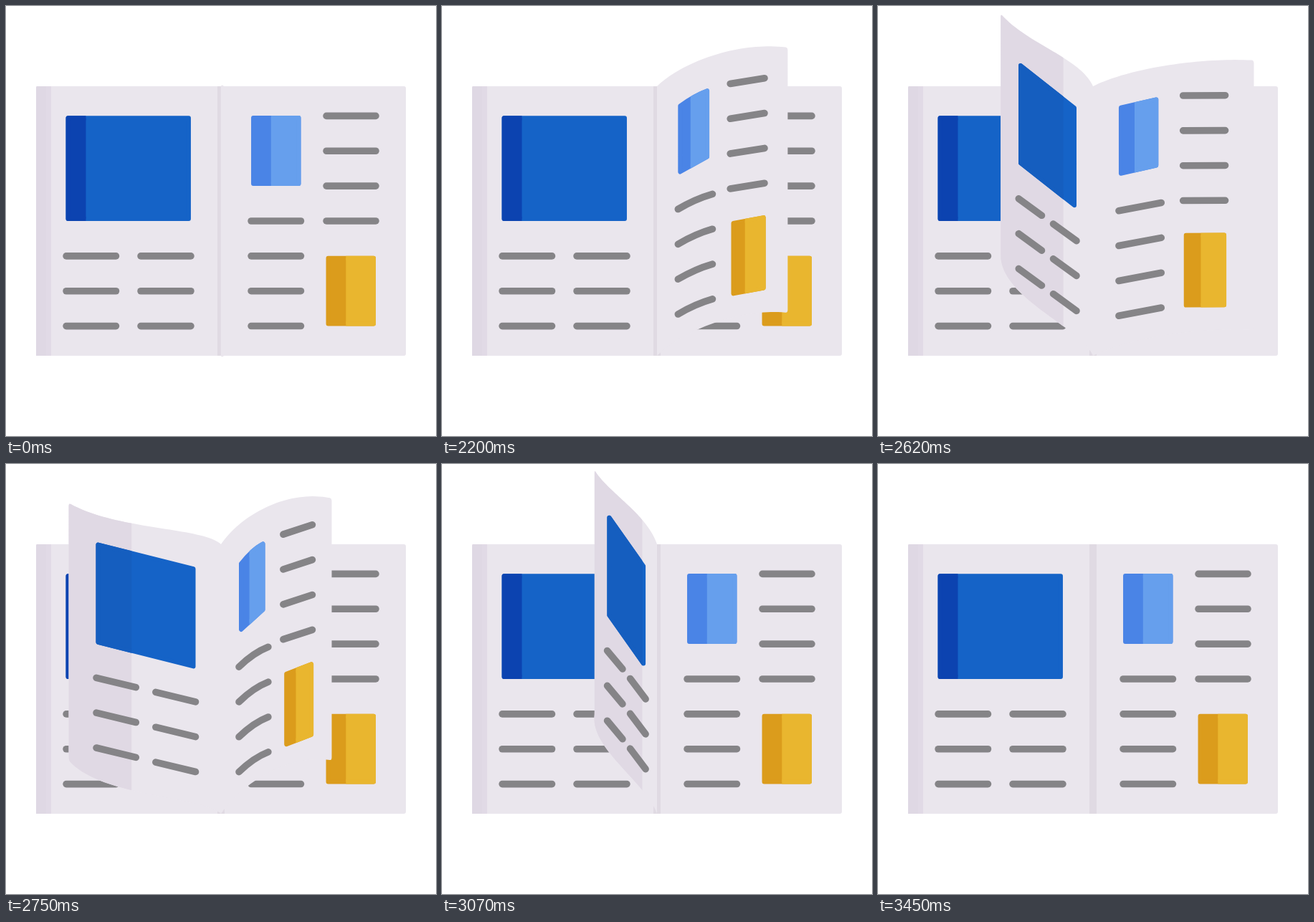
An HTML page with a canvas for the animation above (3.47 s loop, 600 px wide and 600 px high).

```html
<!DOCTYPE html>
<html lang="en">
<head>
<meta charset="utf-8">
<title>Turning pages</title>
<style>
  html, body { margin: 0; width: 100%; height: 100%; overflow: hidden; background: #fff; }
  canvas { display: block; width: 600px; height: 600px; }
</style>
</head>
<body>
<canvas id="stage" width="600" height="600"></canvas>
<script>
const ctx = document.getElementById('stage').getContext('2d');

const LOOP = 3470, STARTS = [2020, 2520], LEAD = 7, TURN = 930;
const SPINE = 300, TOP = 112, BOTTOM = 488;
const PAPER = '#eae6ed', SHADE = '#e0d9e4', LINE = '#858487';

// Each pose: time, top edge curve (x1 y1 x2 y2 x3 y3), bottom edge (x2 y2 y3),
// content x (offset, scale), content lift (constant, linear, square), shade limit, warp
const POSES = [
  [-7, 80, 0, 170, 0, 258, 0, 170, 0, 0, 0, 258, 0, 0, 0, 0, 0],
  [100, 50, 25, 150, 40, 225, 36, 150, 40, 36, 0, 221, 4, 71, -50, 0, 1],
  [380, 1, 45, 14, 104, 60, 89, 12, 120, 112, 0, 61, -12, 191, -64, 0, 1],
  [600, -18, 40, -90, 58, -128, 101, -122, 78, 136, -3.5, -119, 7, 87.5, 0, 0.32, 1],
  [730, -25, 24, -148, 20, -212, 58, -170, 24, 75, -2, -205, 9, 50, 0, 0.585, 1],
  [880, -60, 5, -190, 4, -258, 10, -190, 8, 10, 2, -259, 1, 9.6, 0, 0.857, 0.6],
  [930, -80, 0, -190, 0, -258, 0, -190, 0, 0, 0, -258, 0, 0, 0, 0.918, 0]
];
const LAST = POSES.length - 1;
const clamp = v => Math.max(0, Math.min(1, v));

// Smooth interpolation through the poses
function poseAt(t) {
  let i = 0;
  while (i < LAST - 1 && t > POSES[i + 1][0]) i++;
  const a = POSES[i], b = POSES[i + 1], span = b[0] - a[0];
  const s = clamp((t - a[0]) / span), s2 = s * s, s3 = s2 * s;
  const slope = (j, n) => {
    const p = POSES[Math.max(0, j - 1)], q = POSES[Math.min(LAST, j + 1)];
    return (q[n] - p[n]) / (q[0] - p[0]) * span;
  };
  return read(a.map((v, n) =>
    (2 * s3 - 3 * s2 + 1) * v + (s3 - 2 * s2 + s) * slope(i, n) +
    (3 * s2 - 2 * s3) * b[n] + (s3 - s2) * slope(i + 1, n)));
}

function read(v) {
  const [, x1, y1, x2, y2, x3, y3, bx, by, by3, a0, a1, l0, l1, l2, shade, warp] = v;
  return {
    top: [x1, y1, x2, y2, x3, y3],
    bottom: [x1, y1, bx, by, x3, by3],
    edge: x3,
    x: u => SPINE + a0 + a1 * u,
    lift: u => l0 + l1 * u + l2 * u * u,
    shadeX: SPINE + x3 * shade,
    strip: 0.16 * clamp((shade - 0.585) / 0.272),
    bow: x3 > 0 ? 10 * clamp((l1 - 71) / 120) : 0,
    warp
  };
}

function curvePoint([x1, y1, x2, y2, x3, y3], t, base) {
  const r = 1 - t, a = 3 * r * r * t, b = 3 * r * t * t, c = t * t * t;
  return [SPINE + a * x1 + b * x2 + c * x3, base - a * y1 - b * y2 - c * y3];
}

function clipX(from, to, draw) {
  ctx.save();
  ctx.beginPath();
  ctx.rect(from, 0, Math.max(0, to - from), 600);
  ctx.clip();
  draw();
  ctx.restore();
}

function sheet(p, color) {
  const steps = 40, end = 0.985;
  const x = SPINE + p.edge, yt = TOP - p.top[5], yb = BOTTOM - p.bottom[5];
  ctx.beginPath();
  ctx.moveTo(SPINE, TOP);
  for (let i = 1; i <= steps; i++) ctx.lineTo(...curvePoint(p.top, end * i / steps, TOP));
  ctx.quadraticCurveTo(x, yt, x, yt + 4);
  ctx.lineTo(x, yb - 4);
  ctx.quadraticCurveTo(x, yb, ...curvePoint(p.bottom, end, BOTTOM));
  for (let i = steps; i >= 0; i--) ctx.lineTo(...curvePoint(p.bottom, end * i / steps, BOTTOM));
  ctx.closePath();
  ctx.fillStyle = color;
  ctx.fill();
}

function textLine(p, u0, u1, y) {
  const bow = u1 < 0.5 ? p.bow : 0, um = (u0 + u1) / 2;
  ctx.beginPath();
  ctx.moveTo(p.x(u0), y - p.lift(u0));
  ctx.quadraticCurveTo(p.x(um), y - (p.lift(u0) + p.lift(u1)) / 2 - bow, p.x(u1), y - p.lift(u1));
  ctx.lineWidth = 9.6;
  ctx.lineCap = 'round';
  ctx.strokeStyle = LINE;
  ctx.stroke();
}

function block(p, b, color) {
  const r = Math.min(3, (b.x1 - b.x0) / 10), xm = (b.x0 + b.x1) / 2;
  const y = (u, base, extra) => base - p.lift(u) - extra * p.warp;
  const t0 = y(b.u0, b.top, b.up) + r, t1 = y(b.u1, b.top, b.up) + r;
  const b0 = y(b.u0, b.bottom, b.down) - r, b1 = y(b.u1, b.bottom, b.down) - r;
  const bow = b.bow ? p.bow : 0;
  ctx.beginPath();
  ctx.moveTo(b.x0 + r, t0);
  ctx.quadraticCurveTo(xm, (t0 + t1) / 2 - bow, b.x1 - r, t1);
  ctx.lineTo(b.x1 - r, b1);
  ctx.quadraticCurveTo(xm, (b0 + b1) / 2, b.x0 + r, b0);
  ctx.closePath();
  ctx.fillStyle = ctx.strokeStyle = color;
  ctx.lineWidth = 2 * r;
  ctx.lineJoin = 'round';
  ctx.fill();
  ctx.stroke();
}

function twoTone(p, b, dark, light) {
  block(p, b, dark);
  clipX(b.x0 + (b.x1 - b.x0) * 0.4, 600, () => block(p, b, light));
}

function rightContent(p) {
  twoTone(p, {
    u0: 0.163, u1: 0.432, x0: p.x(0.163), x1: p.x(0.432) - 4 * p.warp,
    top: 153, bottom: 251, up: 0, down: 0, bow: true
  }, '#4a84e6', '#669fed');
  twoTone(p, {
    u0: 0.568, u1: 0.837, x0: p.x(0.568) + 1.5 * p.warp, x1: p.x(0.837) + 1.5 * p.warp,
    top: 348.7, bottom: 446.5, up: 3.5, down: -2.5
  }, '#db9c1c', '#e9b62f');
  for (let i = 0; i < 4; i++) {
    textLine(p, 0.163, 0.432, 300 + i * 48.85);
    textLine(p, 0.57, 0.837, 153.4 + i * 48.85);
  }
}

function leftContent(p) {
  const b = {
    u0: 0.839, u1: 0.163, x0: p.x(0.839), x1: p.x(0.163),
    top: 153.3, bottom: 300, up: -7, down: -2.5
  };
  const split = b.x0 + (b.x1 - b.x0) * p.strip;
  block(p, b, '#1563c7');
  clipX(0, p.shadeX, () => block(p, b, '#155ebf'));
  if (p.strip > 0) clipX(0, split, () => block(p, b, '#0c43b0'));
  for (let i = 0; i < 3; i++) {
    textLine(p, 0.837, 0.568, 348.9 + i * 48.85);
    textLine(p, 0.434, 0.163, 348.9 + i * 48.85);
  }
}

function page(p) {
  sheet(p, PAPER);
  if (p.edge > 0) {
    rightContent(p);
  } else {
    clipX(0, p.shadeX, () => sheet(p, SHADE));
    leftContent(p);
  }
}

const FLAT_RIGHT = read(POSES[0]), FLAT_LEFT = read(POSES[LAST]);

function bar(x, y, w, h, color, radius = 0) {
  ctx.beginPath();
  ctx.roundRect(x, y, w, h, radius);
  ctx.fillStyle = color;
  ctx.fill();
}

function book() {
  bar(42, 112, 516, 376, PAPER, [2, 3, 3, 0]);
  bar(42, 112, 21, 376, '#e1dae6', [2, 0, 0, 0]);
  bar(42, 112, 14, 376, '#dfd8e4', [2, 0, 0, 0]);
  bar(295, 112, 10, 376, '#e0dae3');
  leftContent(FLAT_LEFT);
  rightContent(FLAT_RIGHT);
}

function draw() {
  const now = performance.now() % LOOP;
  ctx.clearRect(0, 0, 600, 600);
  book();
  STARTS.forEach((start, i) => {
    const t = now - start;
    if (t >= -LEAD && t < TURN) page(poseAt(t));
    else if (i === 0 && t < 0) {
      page(FLAT_RIGHT);
      bar(299.8, 110.5, 4, 379, PAPER, 2);
    }
  });
  requestAnimationFrame(draw);
}
draw();
</script>
</body>
</html>
```
